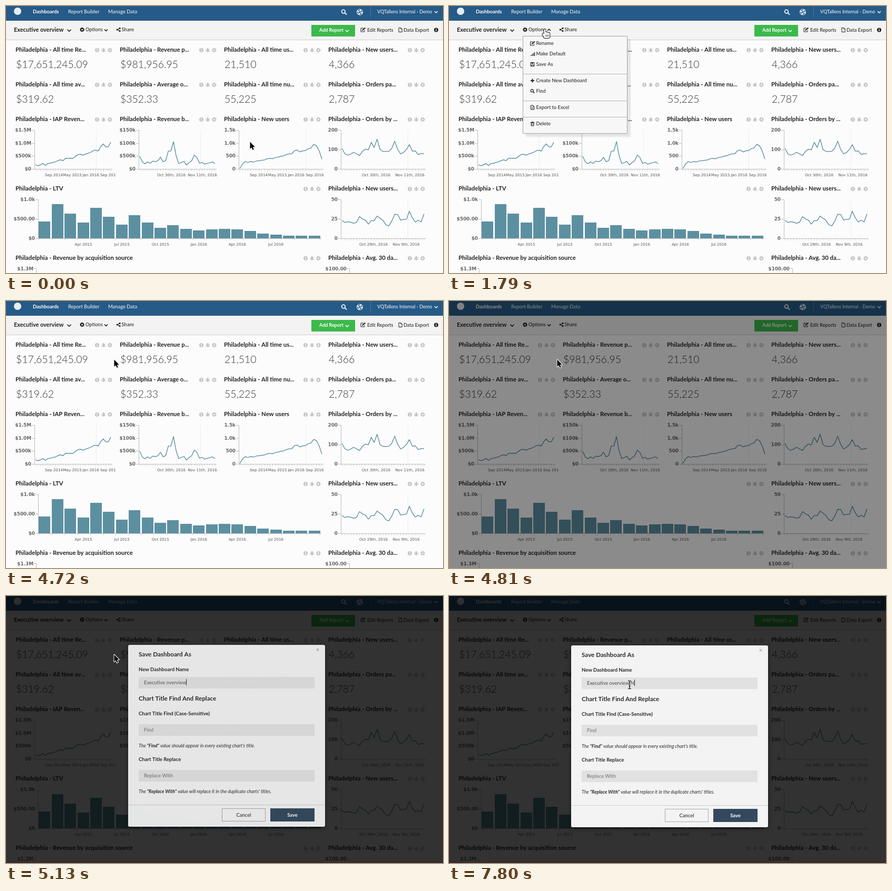
These frames come from a looping animation (830x508 px, 8 s). An HTML page with a canvas:

```html
<!DOCTYPE html>
<html lang="en">
<head>
<meta charset="utf-8">
<title>Dashboard demo</title>
<style>
html, body { margin: 0; width: 100%; height: 100%; overflow: hidden; background: #fcfcfc; }
canvas { display: block; }
</style>
</head>
<body>
<canvas id="stage" width="830" height="508"></canvas>
<script>
const W = 830, H = 508, LOOP = 8000;
const UI = 'Lato, "Open Sans", sans-serif';
const AXIS = '"DejaVu Sans", Verdana, sans-serif';
const INK = '#2b2b2b', TEAL = '#5c90a1', GREY = '#c4c4c4', PANEL = '#f3f3f3';

const stage = document.getElementById('stage').getContext('2d');
let g = stage;

function layer(paint) {
  const c = document.createElement('canvas');
  c.width = W; c.height = H;
  g = c.getContext('2d');
  paint();
  g = stage;
  return c;
}

// ---------- primitives ----------
function text(s, x, y, size, color = INK, weight = 500, align = 'left', family = UI, style = '') {
  g.font = `${style} ${weight} ${size}px ${family}`;
  g.fillStyle = color;
  g.textAlign = align;
  g.fillText(s, x, y + size * 0.355);
  return g.measureText(s).width;
}
function rect(x, y, w, h, color) { g.fillStyle = color; g.fillRect(x, y, w, h); }
function frame(x, y, w, h, color) { g.strokeStyle = color; g.lineWidth = 1; g.strokeRect(x + .5, y + .5, w - 1, h - 1); }
function poly(pts, color, width = 1, close = false) {
  g.beginPath();
  pts.forEach(([x, y]) => g.lineTo(x, y));
  if (close) g.closePath();
  g.strokeStyle = color; g.lineWidth = width; g.lineJoin = 'round';
  g.stroke();
}
function disc(x, y, r, color) { g.beginPath(); g.arc(x, y, r, 0, 7); g.fillStyle = color; g.fill(); }
function ring(x, y, r, color, width) { g.beginPath(); g.arc(x, y, r, 0, 7); g.strokeStyle = color; g.lineWidth = width; g.stroke(); }
function dashedRing(x, y, r, color, width, dash) { g.setLineDash(dash); ring(x, y, r, color, width); g.setLineDash([]); }
function chevron(x, y, color, dir = 1, r = 3) {
  poly([[x - r, y - dir * r / 2], [x, y + dir * r / 2], [x + r, y - dir * r / 2]], color, 1.7);
}

// ---------- icons ----------
const icon = {
  info(x, y, c, bg = '#fcfcfc') {
    disc(x, y, 4, c);
    rect(x - .7, y - 2.7, 1.5, 1.4, bg);
    rect(x - .7, y - .7, 1.5, 3.2, bg);
  },
  bug(x, y, c) {
    g.beginPath(); g.ellipse(x, y + .6, 2.3, 3.2, 0, 0, 7); g.fillStyle = c; g.fill();
    disc(x, y - 2.9, 1.4, c);
    for (const d of [-2.4, .6, 3.2]) poly([[x - 4, y + d], [x, y + .6], [x + 4, y + d]], c, .8);
  },
  gear(x, y, c) {
    ring(x, y, 2.5, c, 2);
    dashedRing(x, y, 3.5, c, 1.6, [1.4, 1.35]);
  },
  share(x, y, c) {
    const nodes = [[x + 2.6, y - 2.6], [x - 2.4, y], [x + 2.6, y + 2.6]];
    poly(nodes, c, 1.1);
    nodes.forEach(([a, b]) => disc(a, b, 1.6, c));
  },
  edit(x, y, c) {
    poly([[x + 1, y - 3], [x - 4, y - 3], [x - 4, y + 4], [x + 3, y + 4], [x + 3, y + 1]], c);
    poly([[x - 1.5, y + 1.6], [x + 4.4, y - 3.6]], c, 2);
  },
  file(x, y, c) {
    poly([[x - 3, y - 4], [x + 1, y - 4], [x + 3.2, y - 1.8], [x + 3.2, y + 4], [x - 3, y + 4]], c, 1, true);
    poly([[x + .8, y - 4], [x + .8, y - 1.6], [x + 3, y - 1.6]], c, .8);
  },
  excel(x, y, c) {
    icon.file(x, y, c);
    for (const d of [-1.4, 1.4]) poly([[x + d, y - .4], [x - d, y + 2.7]], c, .9);
  },
  signal(x, y, c) { for (let i = 0; i < 5; i++) rect(x - 4 + i * 1.9, y + 3 - i * 1.6, 1.1, 1 + i * 1.6, c); },
  save(x, y, c) {
    frame(x - 4, y - 4, 8, 8, c);
    rect(x - 2, y - 3.4, 3.4, 2.3, c);
    frame(x - 2.5, y + .5, 5, 3.5, c);
  },
  plus(x, y, c) { rect(x - 3.5, y - 1, 7, 2, c); rect(x - 1, y - 3.5, 2, 7, c); },
  search(x, y, c, k = 1) {
    ring(x - .8 * k, y - .8 * k, 2.5 * k, c, 1.3 * k);
    poly([[x + 1.1 * k, y + 1.1 * k], [x + 3.8 * k, y + 3.8 * k]], c, 1.5 * k);
  },
  trash(x, y, c) {
    frame(x - 3, y - 2.5, 6, 7, c);
    poly([[x - 4, y - 2.3], [x + 4, y - 2.3]], c);
    rect(x - 1.5, y - 4, 3, 1, c);
    for (const d of [-1, 1]) poly([[x + d, y - .5], [x + d, y + 2.7]], c, .7);
  },
  lifebuoy(x, y, c) {
    for (const r of [5.5, 2.4]) ring(x, y, r, c, 1.1);
    dashedRing(x, y, 4, c, 2.6, [2.6, 3.6]);
  }
};

// ---------- chart data ----------
function random(seed) {
  return () => {
    seed = (seed * 16807) % 2147483647;
    return seed / 2147483647;
  };
}

// A trend with seeded jitter and narrow peaks, each given as [index, height].
function series(n, from, to, bend, jitter, seed, peaks) {
  const rnd = random(seed);
  return Array.from({ length: n }, (_, i) => {
    const trend = from + (to - from) * (i / (n - 1)) ** bend;
    const lift = peaks.reduce((sum, [at, h]) => sum + h * Math.exp(-((i - at) ** 2) * 1.1), 0);
    return trend - lift + (rnd() * 2 - 1) * jitter;
  });
}

// Quarterly rhythm that fades out over a falling trend with a late bump.
function barHeight(i) {
  const trend = 4 + 47 / (1 + Math.exp((i - 8.5) / 2.8)) + 9 * Math.exp(-(((i - 14.8) / 2.2) ** 2));
  const rhythm = .4 * Math.exp(-((i / 11) ** 4)) * Math.cos(2 * Math.PI * (i - 1.25) / 3);
  return Math.round(trend * (1 + rhythm));
}

// ---------- page ----------
function card(x, y, title, tools = x + 155) {
  text(title, x, y, 11.3, '#222', 700);
  ['info', 'bug', 'gear'].forEach((name, i) => icon[name](tools + 12.2 * i, y + 1, GREY));
}

function axes(x, top, right, yLabels, xLabels, firstLabel, labelGap, ticks) {
  const base = top + 74;
  poly([[x + .5, top], [x + .5, base + .5], [right, base + .5]], '#bdbdbd');
  yLabels.forEach((s, i) => {
    const y = top + 74 * i / (yLabels.length - 1);
    poly([[x - 5, Math.round(y) + .5], [x, Math.round(y) + .5]], '#bdbdbd');
    text(s, x - 6, y, 8.9, '#666', 700, 'right', AXIS);
  });
  for (let i = 0; i <= ticks; i++) {
    const tx = x + 2 + (right - x - 5) * i / ticks;
    poly([[tx, base + 1], [tx, base + 4]], '#c8c8c8', .8);
  }
  xLabels.forEach((s, i) => text(s, firstLabel + labelGap * i, base + 11, 7.2, '#555', 400, 'center', AXIS));
}

function lineChart(x, top, yLabels, xLabels, firstLabel, labelGap, ys) {
  const right = x + 148 + (x > 400 ? 13 : 0), guide = Math.round(x + (right - x) * .79) + .5;
  poly([[guide, top], [guide, top + 74]], '#eeeeee');
  axes(x, top, right, yLabels, xLabels, firstLabel, labelGap, ys.length - 1);
  const step = (right - x - 5) / (ys.length - 1);
  poly(ys.map((y, i) => [x + 2 + step * i, y]), '#4f8799', 1.25);
}

function paintNav() {
  const pale = '#e6eef5';
  rect(0, 0, W, 28, '#265a87');
  disc(22, 10, 7, pale);
  text('Dashboards', 51, 11, 9.4, '#fff', 700);
  text('Report Builder', 118, 11, 9.3, pale);
  text('Manage Data', 194, 11, 9.4, pale);
  icon.search(642, 11.5, pale, 1.35);
  icon.lifebuoy(672, 11.5, pale);
  rect(692, 0, 1, 22, '#4a779e');
  text('VQTallens Internal - Demo', 705, 11, 9, pale);
  chevron(817, 11.5, pale);
}

function paintToolbar() {
  rect(0, 28, W, 37, PANEL);
  rect(0, 64, W, 1, '#cfcfcf');
  text('Executive overview', 15, 45, 10.9, '#222', 700);
  chevron(120, 46.5, '#222', 1, 3.5);
  icon.gear(144.5, 45, '#222');
  text('Options', 151, 45, 9.3);
  chevron(190, 46, '#222');
  icon.share(213.5, 45, '#222');
  text('Share', 219.5, 45, 9.5);
  rect(580, 36, 83, 22, '#3cb94b');
  text('Add Report', 595, 46, 9, '#fff', 700);
  chevron(648, 47.5, '#fff');
  icon.edit(678, 45, '#222');
  text('Edit Reports', 686, 45.5, 9.2);
  icon.file(749, 45.5, '#222');
  text('Data Export', 755, 45.5, 9.2);
  icon.info(817, 45.5, '#222', PANEL);
}

function paintCards() {
  const P = 'Philadelphia - ';
  [
    ['All time Re...', '$17,651,245.09', 'All time av...', '$319.62', 'IAP Reven...'],
    ['Revenue p...', '$981,956.95', 'Average o...', '$352.33', 'Revenue b...'],
    ['All time us...', '21,510', 'All time nu...', '55,225', 'New users'],
    ['New users...', '4,366', 'Orders pa...', '2,787', 'Orders by ...']
  ].forEach((cells, col) => {
    const x = 18 + 198 * col;
    cells.forEach((s, i) => {
      const y = 83 + 33 * i;
      if (i % 2) text(s, x + 1, y - 4.5, 19.4, '#333', 300);
      else card(x, y, P + s);
    });
  });
  card(18, 347, P + 'LTV', 569);
  card(612, 347, P + 'New users...');
  card(18, 479, P + 'Revenue by acquisition source', 569);
  card(612, 479, P + 'Avg. 30 da...');
}

function paintCharts() {
  const months = ['Sep 2014', 'May 2015', 'Jan 2016', 'Sep 2016'];
  const days = ['Oct 30th, 2016', 'Nov 11th, 2016'];

  g.save();
  g.beginPath(); g.rect(0, 200, 209, 130); g.clip();
  lineChart(54, 236, ['$1.5M', '$1.0M', '$500k', '$0'], months, 91, 35,
    series(31, 305, 267, 1.15, 3, 11, [[27, 7], [30, 5]]));
  g.restore();
  lineChart(252, 236, ['$150k', '$100k', '$500k', '$0'], days, 314, 59,
    series(30, 298, 300, 1, 4, 5, [[0, 8], [8, 10], [11, 23], [13, 38], [21.5, 20]]));
  lineChart(442, 236, ['1.5k', '1.0k', '500', '0'], months, 480, 35.5,
    series(31, 298, 264, 1.6, 1.8, 8, [[0, -13], [20.5, 6], [27, 5], [30, -28]]));
  lineChart(636, 236, ['200', '100', '0'], days, 703, 64,
    series(29, 281, 279, 1, 4, 21, [[0, 6], [8, 6], [10, 17], [12, 26], [18, 19], [23, 16]]));
  lineChart(636, 368, ['50', '25', '0'], ['Oct 29th, 2016', 'Nov 9th, 2016'], 698, 62,
    series(29, 413, 410, 1, 5, 3, [[6, 8], [12, 12], [16, -12], [18.5, 15], [23, 23], [28, 12]]));

  const quarters = ['Apr 2015', 'Jul 2015', 'Oct 2015', 'Jan 2016', 'Apr 2016', 'Jul 2016'];
  axes(61, 368, 599, ['$1.0k', '$500.00', '$0'], quarters, 147, 73.1, 22);
  for (let i = 0; i < 22; i++) rect(Math.round(62.4 + 24.4 * i), 442 - barHeight(i), 22, barHeight(i), TEAL);

  for (const [s, x] of [['$1.3M', 57], ['$100.00', 652]]) {
    text(s, x - 5, 499.5, 8.9, '#666', 700, 'right', AXIS);
    poly([[x - 4, 499.5], [x + .5, 499.5], [x + .5, H]], '#bdbdbd');
  }
}

function paintPage() {
  rect(0, 0, W, H, '#fcfcfc');
  paintNav();
  paintToolbar();
  paintCards();
  paintCharts();
}

// ---------- menu ----------
const MENU = [
  [['edit', 'Rename'], ['signal', 'Make Default'], ['save', 'Save As']],
  [['plus', 'Create New Dashboard'], ['search', 'Find']],
  [['excel', 'Export to Excel']],
  [['trash', 'Delete']]
];

function drawMenu(pointerY) {
  rect(185, 41, 10, 9, PANEL);
  chevron(190, 45.5, '#222', -1);
  g.save();
  g.shadowColor = 'rgba(0,0,0,.09)';
  g.shadowOffsetX = g.shadowOffsetY = 6;
  g.shadowBlur = 2;
  rect(140, 57, 199, 186, '#f7f7f7');
  g.restore();
  frame(140, 57, 199, 186, '#a3a3a3');
  let y = 71;
  MENU.forEach((group, i) => {
    if (i) {
      rect(141, y - 13, 197, 1, '#b5b5b5');
    }
    for (const [name, label] of group) {
      const hot = Math.abs(pointerY - y) < 10;
      if (hot) rect(141, y - 9, 197, 20, '#62b6dd');
      icon[name](158.5, y, hot ? '#fff' : '#222');
      text(label, 165.5, y, 9.4, hot ? '#fff' : INK);
      y += 20;
    }
    y += 11;
  });
}

// ---------- dialog ----------
function hint(key, rest, y) {
  let x = 252;
  for (const [s, weight] of [['The ', 400], [`"${key}"`, 700], [rest, 400]]) {
    x += text(s, x, y, 8.9, INK, weight, 'left', UI, 'italic');
  }
}

function paintDialog() {
  g.save();
  g.shadowColor = 'rgba(0,0,0,.5)'; g.shadowBlur = 7; g.shadowOffsetY = 2;
  g.beginPath(); g.roundRect(232, 94, 374, 346, 3); g.fillStyle = PANEL; g.fill();
  g.restore();
  text('Save Dashboard As', 252, 112, 11.7, INK, 700);
  text('×', 592, 103, 11, '#888', 400, 'center');
  text('New Dashboard Name', 252, 141, 9.5, INK, 700);
  text('Chart Title Find And Replace', 252, 195.5, 11.6, INK, 700);
  text('Chart Title Find (Case-Sensitive)', 252, 225, 9.5, INK, 700);
  text('Chart Title Replace', 252, 312, 9.5, INK, 700);
  for (const y of [155, 245, 332]) rect(252, y, 334, 22, '#e1e1e1');
  text('Find', 262, 255.5, 9.4, '#777');
  text('Replace With', 262, 342.5, 9.4, '#777');
  hint('Find', " value should appear in every existing chart's title.", 286);
  hint('Replace With', " value will replace it in the duplicate charts' titles.", 373);
  rect(232, 398, 374, 1, '#cccccc');
  frame(410, 405, 83, 25, '#a8a8a8');
  text('Cancel', 451.5, 417.5, 9.4, INK, 500, 'center');
  rect(502, 405, 84, 25, '#34495e');
  text('Save', 544, 417.5, 9.4, '#fff', 700, 'center');
}

function drawField(t, dy) {
  const value = 'Executive overview' + (t >= 7800 ? ' N' : t >= 7540 ? ' ' : '');
  const w = text(value, 262, 165.5 + dy, 9.4, '#555');
  const caretOn = t >= 7180 || Math.floor((t - 5140) / 530) % 2 === 0 || t < 5140;
  if (caretOn) rect(Math.round(262 + w), 159 + dy, 1, 12, '#222');
}

function drawDialog(t) {
  const left = 1 - Math.min(3, Math.floor((t - 4900) / 106.6)) / 3;
  const dy = Math.round(-334 * left ** 5);
  g.globalAlpha = 1 - .9 * left ** 2.4;
  g.drawImage(dialog, 0, dy);
  drawField(t, dy);
  g.globalAlpha = 1;
}

// ---------- pointer ----------
// [start, end, steps, x, y, easing power]
const MOVES = [
  [440, 640, 3, 361, 131, 1],
  [820, 1520, 9, 182, 44, 1.6],
  [3310, 3660, 5, 182, 103, 1],
  [3750, 4010, 4, 205, 111, 1.5],
  [5850, 6730, 11, 343, 169, 1.4]
];

function pointerAt(t) {
  let x = 463, y = 258;
  for (const [start, end, steps, tx, ty, power] of MOVES) {
    if (t < start) break;
    const step = Math.min(steps, Math.floor((t - start) / (end - start) * (steps - 1) + .05) + 1);
    const p = 1 - (1 - step / steps) ** power;
    x += (tx - x) * p;
    y += (ty - y) * p;
  }
  return [x, y];
}

function drawArrow(x, y) {
  const pts = [[.5, .5], [.5, 14], [3.6, 11.2], [5.7, 16], [7.8, 15.1], [5.7, 10.4], [9.8, 10.2]];
  poly(pts.map(([a, b]) => [x + a, y + b]), '#fff', 2, true);
  g.fillStyle = '#000';
  g.fill();
}

function drawHand(x, y) {
  g.beginPath();
  for (let i = 0; i < 4; i++) g.roundRect(x - 1.4 + 2.6 * i, y + (i && 5 + .6 * i), 2.8, 9, 1.4);
  g.roundRect(x - 4.4, y + 8, 3, 5, 1.4);
  g.roundRect(x - 2.2, y + 8.5, 11, 8.5, 3);
  g.strokeStyle = '#111'; g.lineWidth = 2; g.stroke();
  g.fillStyle = '#fff'; g.fill();
  for (const d of [2, 4.3, 6.6]) poly([[x + d, y + 10.5], [x + d, y + 14.5]], '#111', .8);
}

function drawBeam(x, y) {
  poly([[x, y - 7], [x, y + 7]], '#111', 1.3);
  for (const d of [-1, 1]) poly([[x - 3, y + d * 8], [x, y + d * 7], [x + 3, y + d * 8]], '#111', 1.2);
  poly([[x - 1.5, y + 2.5], [x + 1.5, y + 2.5]], '#111');
}

function drawPointer(t) {
  const [x, y] = pointerAt(t);
  const overField = t >= 5850 && x > 252 && y > 155;
  const overLink = t < 4720 && (t >= 1790 || y < 53);
  (overField ? drawBeam : overLink ? drawHand : drawArrow)(x, y);
}

// ---------- scene ----------
const page = layer(paintPage);
const dialog = layer(paintDialog);

function draw(t) {
  g.drawImage(page, 0, 0);
  // The highlight trails the pointer by about one step.
  if (t >= 1790 && t < 4720) drawMenu(t >= 3310 ? pointerAt(t - 80)[1] : 0);
  if (t >= 4810) rect(0, 0, W, H, `rgba(0,0,0,${t < 4900 ? .45 : .8})`);
  if (t >= 4900) {
    rect(0, 505, W, 3, '#3a2a30');
    drawDialog(t);
  }
  drawPointer(t);
}

const begin = performance.now();
function tick() {
  draw((performance.now() - begin) % LOOP);
  requestAnimationFrame(tick);
}
tick();
</script>
</body>
</html>
```
